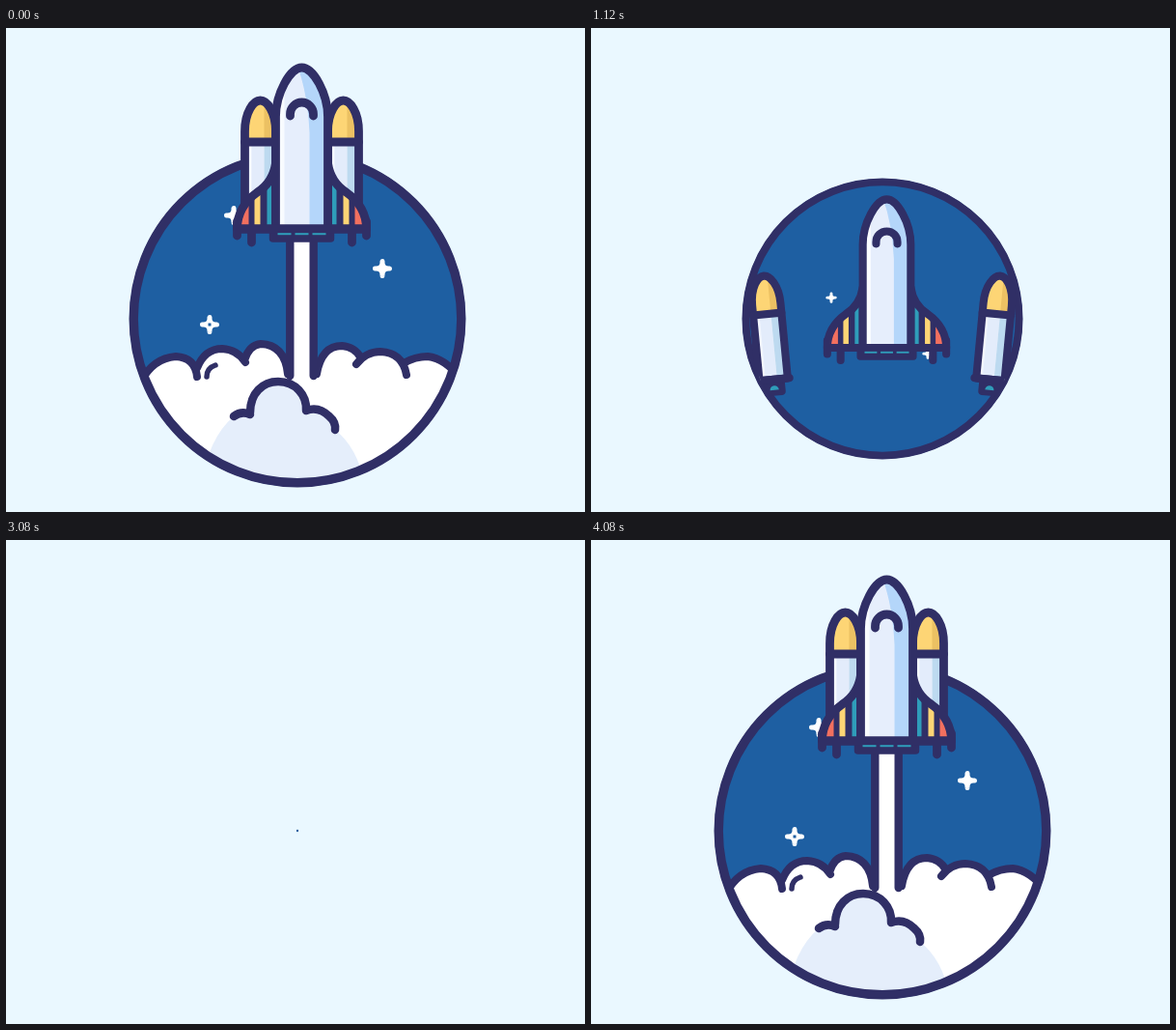
An HTML page with a canvas for the animation above (4120 ms loop, 600x501 px).

```html
<!DOCTYPE html>
<html lang="en">
<head>
<meta charset="utf-8">
<title>Shuttle launch</title>
<style>
html, body { margin: 0; width: 100%; height: 100%; overflow: hidden; background: #eaf8ff; }
canvas { display: block; width: 600px; height: 501px; }
</style>
</head>
<body>
<canvas id="stage" width="600" height="501"></canvas>
<script>
const ctx = document.getElementById('stage').getContext('2d');
const LOOP = 4120, STEP = 40, CX = 302, CY = 301, FULL = 174.5, LOW = 145.5;
const LEAVE = 1120, REVEAL = 3060, SETTLED = 4080;
const NAVY = '#302f66', BLUE = '#1e5fa2', TEAL = '#2f9dba', SKY = '#eaf8ff';

const clamp = (v, a = 0, b = 1) => Math.min(b, Math.max(a, v));
const sineOut = u => Math.sin(clamp(u) * Math.PI / 2);
const sineInOut = u => (1 - Math.cos(clamp(u) * Math.PI)) / 2;

// Lightly underdamped step response that comes to rest at SETTLED.
function spring(t, start, unit) {
  const x = Math.max(0, (t - start) / unit), w = 0.65, d = 0.76;
  const rest = Math.exp(-d * x) * (Math.cos(w * x) + d / w * Math.sin(w * x));
  return 1 - rest * clamp((SETTLED - t) / 200);
}

// Everything that moves, as a function of time.
function pose(t) {
  if (t >= REVEAL) {
    const f = spring(t, REVEAL + 80, 194);
    return {
      r: FULL * spring(t, REVEAL, 170),
      x: 302 + 4.5 * f * f, y: 508 - 300 * f, k: 0.53 + 0.47 * f,
      tip: 6 * Math.max(0, 1 - f), fall: 250 * (f - 1), trail: 1, apart: 0, shrink: 1, gone: 1, dim: 1
    };
  }
  const u = clamp(t / LEAVE), f = sineOut(u ** 1.07);
  const left = 1 - sineInOut((t - LEAVE) / 690);
  return {
    r: (FULL - (FULL - LOW) * sineOut(u)) * left,
    x: 306.5, y: 208 + 123 * f, k: 1 - 0.08 * f,
    tip: Math.min(6, (t / 320) ** 1.6), fall: 0.284 * t, trail: clamp((800 - t) / 300),
    apart: Math.max(0, (t - 200) / 920), shrink: left, gone: left * clamp((1640 - t) / 400), dim: 1 - t / 2600
  };
}

const sky = [[211, 307], [390, 249], [236, 194], [371, 131], [249, -39], [349, 19]];

// dx, dy, radius, share of the way at 1720 ms
const burst = [[-24, -205, 2.7, 0.29], [158, -121, 6, 0.41], [-118, -61, 8, 0.18], [160, 0, 7, 0.345],
  [126, 67, 6, 0.14], [-14, 130, 5, 0.245], [-181, 137, 8, 0.28]];

const P = s => new Path2D(s);
const banks = [
  { pivot: 130, turn: 1,
    fill: P('M60 372H130Q150 340 176 340Q192 341 197 352Q206 332 224 332Q240 333 247 345Q251 328 264 327' +
      'Q286 328 290 352L310 366L700 700H60Z'),
    line: P('M140 366Q152 342 176 340Q196 341 198 361M198 352Q206 332 224 332Q240 333 248 346' +
      'M247 344Q252 328 264 327Q289 328 292 358') },
  { pivot: 475, turn: -1,
    fill: P('M540 372H484Q455 342 437 340Q424 340 414 350Q406 336 388 335Q377 335 369 345Q364 330 348 329' +
      'Q330 329 324 352L304 366L-90 700H540Z'),
    line: P('M322 358Q327 329 348 329Q362 330 368 342M363 348Q373 335 388 335Q411 336 415 359' +
      'M412 347Q424 340 437 340Q455 342 470 362') }
];
const cloudMark = P('M217 349Q208 352 208 361');
const puffFill = P('M236 402Q244 396 253 401C252 380 266 366 282 366C300 366 311 380 311 396' +
  'Q326 391 338 404Q342 410 341 416Q372 440 375 500V700H200V500Q203 430 236 402Z');
const puffLine = P('M236 402Q244 396 253 400M253 398C253 378 266 366 282 366C300 366 312 380 311 396' +
  'M311 396Q324 391 335 402Q342 408 341 416');

const body = P('M-27 0V-116C-27 -140 -12 -167 0 -167C12 -167 27 -140 27 -116V0Z');
const bodyShade = P('M8 0V-100Q6 -140 -4 -167H30V0Z');
const fin = P('M-27 -68Q-30 -48 -46 -38Q-67 -23 -67 0H-27Z');
const arch = P('M-12 -117V-119A12 12 0 0 1 12 -119V-117');
const base = P('M-67 0H67M-67 -8V7M67 -8V7M-52 0V14M52 0V14');
const tank = P('M-16 117V32C-16 12 -7 0 0 0C7 0 16 12 16 32V117Z');
const nozzle = P('M-8 119V131H8V119Z');
const dome = P('M-5 129A5 5 0 0 1 5 129Z');

function fill(path, color) { ctx.fillStyle = color; ctx.fill(path); }
function line(path, width = 8.8) {
  ctx.strokeStyle = NAVY;
  ctx.lineWidth = width;
  ctx.stroke(path);
}
function bar(x, y, w, h, color) { ctx.fillStyle = color; ctx.fillRect(x, y, w, h); }
function group(draw) { ctx.save(); draw(); ctx.restore(); }
function zoom(s) { ctx.translate(CX, CY); ctx.scale(s, s); ctx.translate(-CX, -CY); }
function disc(r) {
  const p = new Path2D();
  p.arc(CX, CY, Math.max(0, r), 0, 2 * Math.PI);
  return p;
}

function star(x, y, r, color) {
  const a = r * 0.75, c = -r * 0.05;
  ctx.beginPath();
  for (let i = 0; i <= 4; i++) {
    const sin = Math.round(Math.sin(i * Math.PI / 2)), cos = Math.round(Math.cos(i * Math.PI / 2));
    if (i) ctx.quadraticCurveTo(x + c * (cos + sin), y + c * (sin - cos), x + a * cos, y + a * sin);
    else ctx.moveTo(x + a, y);
  }
  ctx.closePath();
  ctx.fillStyle = ctx.strokeStyle = color;
  ctx.lineWidth = r * 0.5;
  ctx.fill();
  ctx.stroke();
}

function drawBurst(t) {
  if (t < 1400 || t >= 3080) return;
  const now = Math.min(t, 2360);
  for (const [dx, dy, r, at] of burst) {
    const u = at + (now - 1720) / 720;
    if (u <= 0 || u >= 1.04) continue;
    const far = 1 - (1 - Math.min(u, 1)) ** 2;
    ctx.globalAlpha = clamp((1.04 - u) / 0.29);
    star(CX + dx * far, CY + dy * far, r * Math.min(1, (u / 0.3) ** 1.8), NAVY);
  }
  ctx.globalAlpha = 1;
}

function drawSky(t, p) {
  group(() => {
    zoom(Math.min(p.shrink, t > REVEAL ? p.r / FULL : 1));
    for (const [x, y] of sky) star(x, y + p.fall, 10 * p.dim, '#fff');
    bar(sky[0][0] - 1.5, sky[0][1] + p.fall - 1.5, 3, 3, BLUE);
  });
  const flash = Math.sin(Math.PI * clamp((t - 3280) / 240));
  if (flash > 0.01) star(267, 272, 11 * flash, NAVY);
}

// The banks tip outwards around the rim while the puff in front sinks.
function drawClouds(p) {
  const angle = 0.26 * p.tip;
  for (const part of ['fill', 'line']) {
    for (const bank of banks) group(() => {
      ctx.translate(bank.pivot, 340);
      ctx.rotate(bank.turn * angle);
      ctx.translate(-bank.pivot, -340);
      if (part === 'fill') fill(bank.fill, '#fff');
      else {
        line(bank.line, 8);
        if (bank.turn > 0) line(cloudMark, 5.5);
      }
    });
  }
  drawTrail(p, 360 + 162 * Math.sin(angle));
  group(() => {
    ctx.translate(0, 23 * p.tip);
    fill(puffFill, '#e5eefb');
    line(puffLine, 8.5);
  });
}

function drawTrail({ x, y, k, trail }, end) {
  if (!trail || end <= y) return;
  const half = 12.2 * k * trail;
  bar(x - half, y, half * 2, end + 8 - y, '#fff');
  line(P(`M${x - half} ${y}V${end}M${x + half} ${y}V${end}`), 8.4 * k * trail);
}

function drawBooster(side, { x, y, k, apart }) {
  group(() => {
    ctx.translate(x + side * 43 * k + 83 * (side - 0.06) * apart ** 1.3, y - 133 * k + 48 * apart ** 1.5);
    ctx.rotate(side * 0.095 * apart * apart);
    ctx.scale(k, k);
    fill(nozzle, NAVY);
    line(nozzle);
    fill(dome, TEAL);
    group(() => {
      ctx.clip(tank);
      bar(-20, 0, 40, 43, '#fdd575');
      bar(4, 0, 16, 43, '#ecc163');
      bar(-20, 43, 40, 75, '#f4f8ff');
      bar(-9, 43, 13, 75, '#e3ecfb');
      bar(4, 43, 16, 75, '#bddaf0');
    });
    line(tank);
    line(P('M-16 43H16M-18 117H18'));
  });
}

function drawFin(side) {
  group(() => {
    ctx.scale(side, 1);
    fill(fin, NAVY);
    group(() => {
      ctx.clip(fin);
      bar(-64, -70, 9, 70, '#f2705f');
      bar(-49, -70, 6, 70, '#fdd575');
      bar(-36, -70, 5, 70, TEAL);
    });
    line(fin);
  });
}

function drawShuttle({ x, y, k }) {
  group(() => {
    ctx.translate(x, y);
    ctx.scale(k, k);
    drawFin(-1);
    drawFin(1);
    group(() => {
      ctx.clip(body);
      bar(-30, -170, 60, 170, '#e6eefc');
      bar(-30, -170, 12, 170, '#f8fbff');
      fill(bodyShade, '#b4d6fa');
    });
    line(body);
    line(arch);
    bar(-30, 0, 60, 10, NAVY);
    line(P('M-30 0H30V10H-30Z'), 7.5);
    line(base);
    for (const side of [-1, 0, 1]) bar(side * 18 - 7, 4.2, 14, 2, TEAL);
  });
}

function render(t) {
  bar(0, 0, 600, 501, SKY);
  ctx.lineCap = ctx.lineJoin = 'round';
  drawBurst(t);

  const p = pose(t), s = p.r / FULL;
  if (s < 0.001) return;
  fill(disc(p.r - s * 0.5), BLUE);
  group(() => {
    ctx.clip(disc(p.r - 4 * s));
    drawSky(t, p);
    drawClouds(p);
  });
  line(disc(p.r - 4.7 * s), 9.4 * s);

  if (!p.gone) return;
  group(() => {
    // Inside the rim, but open at the top.
    const view = disc(p.r - 5 * s);
    view.rect(220, -10, 172, 210);
    ctx.clip(view);
    zoom(p.gone);
    drawBooster(-1, p);
    drawBooster(1, p);
    drawShuttle(p);
  });
}

function tick(now) {
  render(Math.floor(now % LOOP / STEP) * STEP);
  requestAnimationFrame(tick);
}
tick(performance.now());
</script>
</body>
</html>
```
